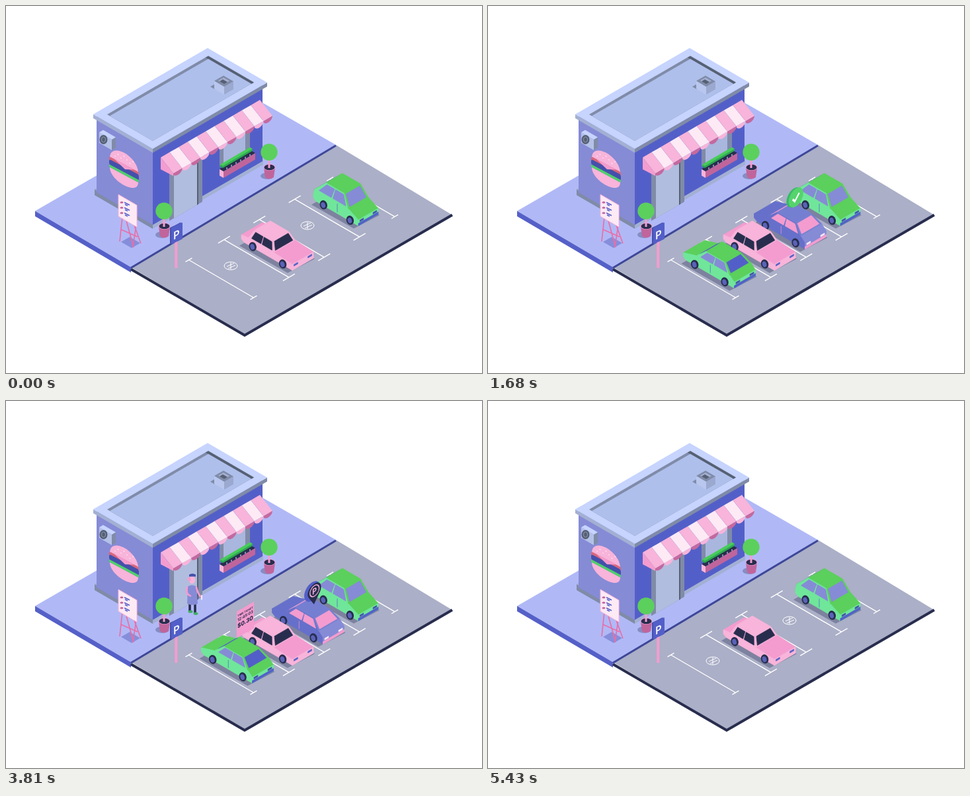
An HTML page that plays this animation: 720x555 px, repeating every 5.46 s.

```html
<!DOCTYPE html>
<html lang="en">
<head>
<meta charset="utf-8">
<title>Parking lot</title>
<style>
html, body { margin: 0; width: 100%; height: 100%; overflow: hidden; background: #fff; }
svg { display: block; width: 720px; height: 555px; }
text { font-family: Inter, Arial, sans-serif; text-anchor: middle; }
</style>
</head>
<body>
<svg id="stage" viewBox="0 0 720 555"></svg>
<script>
const LOOP = 5460, STEP = 30;
const S = .58; // slope of both ground axes on screen
const C = {
  ink: '#282d4e', navy: '#4450ab', blue: '#535fc8', lilac: '#868bd6', walk: '#b0b9f6', road: '#abafc7',
  slate: '#566074', grey: '#808ba8', mid: '#a3b0d3', sky: '#aebfeb', pale: '#c6d4fe',
  pink: '#f8b4da', hot: '#f49ccf', plum: '#c0659c', cream: '#fdeaf5',
  green: '#5bd05c', leaf: '#2aab4c', mint: '#70e69b', shade: '#7d829f'
};

// Markup helpers
const poly = (pts, fill, extra = '') => `<polygon points="${pts}" fill="${fill}" ${extra}/>`;
const path = (d, fill, extra = '') => `<path d="${d}" fill="${fill}" ${extra}/>`;
const line = (d, color, w = 1.5) => path(d, 'none', `stroke="${color}" stroke-width="${w}"`);
const oval = (x, y, rx, ry, fill, extra = '') =>
  `<ellipse cx="${x}" cy="${y}" rx="${rx}" ry="${ry}" fill="${fill}" ${extra}/>`;
const group = (body, attr) => `<g ${attr}>${body}</g>`;
const label = (s, x, y, size, fill, weight = 700) =>
  `<text x="${x}" y="${y}" font-size="${size}" fill="${fill}" font-weight="${weight}">${s}</text>`;
const times = (n, f) => Array.from({ length: n }, (_, i) => f(i)).join('');
const soft = color => `stroke="${color}" stroke-width="2" stroke-linejoin="round"`;

// Upright panel from its lower left corner; k is the slope of its base
const panel = (x, y, w, h, fill, k = -S, extra = '') =>
  poly([[x, y], [x + w, y + k * w], [x + w, y + k * w - h], [x, y - h]], fill, extra);
// Flat tile from its nearest corner: a runs to the back left, b to the back right
const tile = (x, y, a, b, fill) =>
  poly([[x, y], [x - a, y - S * a], [x - a + b, y - S * (a + b)], [x + b, y - S * b]], fill);
const box = (x, y, a, b, h, [top, left, right]) =>
  panel(x - a, y - S * a, a, h, left, S) + panel(x, y, b, h, right) + tile(x, y - h, a, b, top);

function ground() {
  const left = [44, 310], front = [189, 395], right = [499, 210], near = [361, 498], far = [675, 316];
  const down = ([x, y], d) => [x, y + d];
  return poly([left, [358, 129], right, front], C.walk)
    + poly([left, front, down(front, 8), down(left, 8)], '#5560c8')
    + poly([front, right, far, near], C.road)
    + line(`M${down(front, 1)}L${down(right, 1)}`, '#3d4798', 3)
    + line(`M${down(front, 3)}L${near}L${far}`, C.ink, 4);
}

function bays() {
  const lines = times(5, i => {
    const x = 276.5 + 53.4 * i, y = 384 - 30.6 * i, r = i % 4 ? 9 : 5;
    const tick = (a, b) => `M${a - r},${b + r * S}l${2 * r},${-2 * r * S}`;
    return line(`M${x},${y}l98,57${tick(x, y)}${tick(x + 98, y + 57)}`, '#fff', 1.4);
  });
  const marks = times(2, i => {
    const x = 340 + 116 * i, y = 393 - 61 * i;
    return oval(x, y, 10, 6, 'none', 'stroke="#fff"')
      + line(`M${x - 6},${y + 1}l11,-5m-9,8l11,-5M${x},${y - 5}v10`, '#fff', 1);
  });
  return lines + marks;
}

function building() {
  return box(222, 337, 88, 167, 9, [C.mid, C.grey, C.mid])
    + box(222, 331, 85, 166, 114, [C.lilac, C.lilac, C.blue])
    + box(222, 222, 90, 173, 6, [C.pale, C.mid, C.grey])
    + tile(222, 204, 69, 153, C.grey)
    + tile(371, 118, 69, 4, C.slate)
    + tile(222, 204, 65, 149, C.sky)
    + tile(316, 126, 7, 8, C.grey)
    + box(330, 134, 15, 14, 12, [C.grey, '#b9c7ef', '#9ba9d0'])
    + tile(330, 118, 9, 8, C.mid) + tile(330, 118, 7, 5, C.slate);
}

function facade() {
  return panel(247, 325, 50, 76, C.grey) + panel(254, 321, 36, 74, '#b1bdde')
    + panel(289, 301, 2, 74, C.slate)
    + panel(323, 243, 46, 35, C.grey) + panel(329, 238, 33, 31, '#a9b6de')
    + box(329, 260, 6, 48, 10, [C.ink, C.pink, C.plum])
    + box(328, 245, 4, 45, 3, ['#46cd57', C.leaf, C.leaf])
    + times(6, i => line(`M${334 + i * 7},${244 - i * 4}v3`, '#dfe6ff', 1));
}

function awning() {
  const n = 11, w = 150 / n, drop = 24, out = 19;
  return poly('234,229 253,253 253,257 234,247', C.hot) + times(n, i => {
    const x = 234 + i * w, y = 229 - i * w * S, a = x + out, b = y + drop, white = i % 2;
    return path(`M${a},${b}c0,8 ${w},${9 - w * S} ${w},${-w * S}Z`, white ? C.pink : '#c4699f')
      + poly([[x, y], [x + w, y - w * S], [a + w, b - w * S], [a, b]], white ? C.cream : C.pink);
  });
}

function sideWall() {
  const fan = box(160, 218, 19, 6, 16, [C.pale, '#b4c1e8', C.grey])
    + oval(147.5, 202, 6, 7, C.slate) + oval(147.5, 202, 3, 4, 'none', 'stroke="#8d98b5"');
  const layer = (y, h, color) => `<rect x="-22" y="${y}" width="45" height="${h}" rx="${h / 3}" fill="${color}"/>`;
  const bun = (y, h) => path(`M-21,${y}C-21,${y + h} 22,${y + h} 22,${y}Z`, C.pink);
  const burger = bun(-7, -26) + layer(-9, 7, '#d8667e') + layer(-5, 9, C.navy)
    + path('M-14,-9H16L2,-2Z', C.hot) + bun(7, 21) + layer(3, 4, '#4fd06a')
    + times(7, i => oval(-13 + i * 4.5, -14 - i * 5 % 8, 1, .7, C.cream));
  return fan + group(burger, 'transform="matrix(1 .53 0 1 178 248)"');
}

function menuBoard() {
  return tile(190, 366, 16, 13, '#868edb')
    + line('M176,319l-4,37M181,321l12,44M197,331l-5,34M193,329l11,30M174,338l25,11', '#e86fa8', 1.7)
    + panel(170, 318, 28, 33, C.cream, S, `stroke="${C.pink}"`)
    + times(3, i => oval(175, 297 + 8 * i, 2.5, 1.6, C.plum)
      + line(`M179,${297 + 8 * i}l8,4m-7,-1l4,2`, C.blue, 1.4));
}

function plant(x, y) {
  return oval(x - 3, y + 36, 10, 5, '#868dc3')
    + path(`M${x - 8},${y + 24}l2,14q6,5 13,0l2,-14Z`, C.plum)
    + oval(x + .5, y + 23, 9, 5, C.hot) + oval(x + .5, y + 23, 8, 4.3, C.ink)
    + line(`M${x},${y + 10}v14`, C.hot, 3)
    + oval(x, y, 12.7, 12.7, C.green);
}

function roadSign() {
  return line('M257.3,354V396', C.hot, 4)
    + panel(249, 359, 15, 23, C.navy, -.5, soft(C.navy))
    + panel(251, 359, 15, 23, C.blue, -.5, soft(C.blue))
    + group(label('P', 0, 5.5, 16, '#fff', 600), 'transform="matrix(.9 -.45 0 1 258 346)"');
}

// A car is a body with sloping ends and a tapered cabin, placed by its near rear corner
function car({ len = 77, wide = 32, nose = 9, belt, top, base, roof, taper = 4, paint }) {
  const at = (u, v, z) => [u + v, S * (u - v) - z];
  const mix = (a, b, k) => a.map((n, i) => n + (b[i] - n) * k);
  // Part of a four-cornered face: x0..x1 along its first edge, y0..y1 across
  const part = ([a, b, c, d], x0, x1, y0, y1) => [[x0, y0], [x1, y0], [x1, y1], [x0, y1]]
    .map(([x, y]) => mix(mix(a, b, x), mix(d, c, x), y));
  const face = (pts, color) => poly(pts, color, `stroke="${color}" stroke-width=".8" stroke-linejoin="round"`);
  const across = ([u0, z0], [u1, z1], i0 = 0, i1 = 0) =>
    [at(u0, i0, z0), at(u0, wide - i0, z0), at(u1, wide - i1, z1), at(u1, i1, z1)];

  const profile = [[0, nose], [base[0], belt], [base[1], belt], [len, nose]];
  const side = [at(base[0], 0, belt), at(base[1], 0, belt), at(roof[1], taper, top), at(roof[0], taper, top)];
  const rear = across([base[0], belt], [roof[0], top], 0, taper);
  const screen = across([roof[1], top], [base[1], belt], taper, 0);
  const end = across([len, nose], [len, 0]);
  const wheel = u => group(oval(0, 0, 5.6, 7, C.ink) + oval(-.6, .2, 3.2, 4.4, '#5963b8'),
    `transform="translate(${at(u, 1, 0)}) rotate(-18)"`);

  return poly([at(5, -8, 0), at(len, -7, 0), at(len + 2, wide, 0), at(5, wide, 0)], C.shade)
    + face(across(profile[0], profile[1]), paint.rear)
    + face(across(profile[2], profile[3]), paint.hood)
    + face([at(0, 0, 3), at(4, 0, 0), at(len, 0, 0), ...profile.map(([u, z]) => at(u, 0, z)).reverse()], paint.side)
    + face(end, paint.front) + face(part(end, 0, 1, .6, 1), paint.bumper)
    + times(2, i => face(part(end, .08 + .66 * i, .26 + .66 * i, .2, .45), paint.lamp))
    + face(rear, paint.top) + face(part(rear, .1, .9, .15, .85), paint.glass)
    + face(side, paint.side)
    + face(part(side, .1, .48, .1, .86), paint.window)
    + face(part(side, .53, .93, .1, .86), paint.window)
    + face(screen, paint.top) + face(part(screen, .08, .92, .1, .92), paint.glass)
    + face(across([roof[0], top], [roof[1], top], taper, taper), paint.top)
    + line(`M${at(len * .53, 0, belt - 2)}v${belt - 4}`, paint.bumper, .7)
    + wheel(len * .21) + wheel(len * .8);
}

const SEDAN = { belt: 16, top: 27, base: [20, 70], roof: [31, 59] };
const greens = { side: C.mint, top: C.green, rear: C.green, hood: C.green, front: C.mint,
  glass: C.blue, window: C.lilac, bumper: C.blue, lamp: C.navy };
const blues = { side: '#6670cb', top: '#757fd2', rear: '#6670cb', hood: C.lilac, front: C.lilac,
  glass: C.hot, window: C.hot, bumper: C.hot, lamp: C.cream };
const pinks = { side: C.pink, top: C.pink, rear: C.hot, hood: C.hot, front: C.pink,
  glass: C.ink, window: C.ink, bumper: C.pink, lamp: '#5963c6' };

const greenCar = car({ ...SEDAN, paint: greens });
const blueCar = car({ ...SEDAN, paint: blues });
const pinkCar = car({ belt: 11, top: 23, base: [11, 49], roof: [16, 44], paint: pinks });
const hatch = car({ len: 68, wide: 30, belt: 17, top: 34, base: [2, 53], roof: [17, 44], taper: 3,
  paint: { ...greens, glass: C.lilac } });

// Upright badges standing beside the bays, drawn around their own centre
const ISO = 'transform="matrix(.87 -.5 0 1 0 0)"';
const disc = (side, face, mark) => group(
  oval(-3, -2, 13.5, 13.5, side) + oval(1, 0, 13.5, 13.5, face) + mark, ISO);
const checkPin = disc('#37b967', '#55d36c', line('M-5,0L-1,5L7,-4', '#fff', 3));
const crossPin = disc('#ef5870', '#ff7184', line('M0,-7V7M-7,0H7', '#fff', 3));
const parkPin = group(oval(-2, -3, 14, 14, C.blue)
  + path('M1,18L-8,4C-14,-6 -4,-14 4,-13C14,-12 16,0 10,6Z', C.ink)
  + oval(2, -2, 8, 8, 'none', `stroke="${C.pink}" stroke-width="1.5"`)
  + label('P', 2, 2.5, 12, C.pink), ISO);
const ticket = group(`<rect x="-15" y="-20" width="30" height="40" fill="${C.hot}"/>`
  + label('TIME TICKET', 0, -11, 4.2, C.ink) + label('12:45:03', 0, -4, 6.2, C.ink)
  + label('$0.30', 0, 6, 9, C.ink, 800), ISO);

function worker() {
  const leg = (id, x, y) => group(line(`M${x},300V${y}`, C.ink, 3.6)
    + oval(x + 1, y + 1, 3.5, 2, '#3fae63'), `id="${id}"`);
  return leg('legA', 272, 314) + leg('legB', 280, 317)
    + path('M269,277q6,-4 13,0l2,26q-8,4 -16,0Z', C.lilac)
    + path('M268,278q-3,10 5,13M282,278q2,9 6,14', 'none',
      `stroke="${C.hot}" stroke-width="2.6" stroke-linecap="round"`)
    + line('M290,290v7', C.cream, 2)
    + oval(275.5, 267, 4.5, 6, C.pink) + oval(271, 266, 2.5, 3, C.hot)
    + path('M271,262v-3q5,-3 10,0v3Z', C.navy);
}

const stage = document.getElementById('stage');
const spot = (body, x, y) => group(body, `transform="translate(${x} ${y})"`);
const clipped = (body, id, clip) => group(group(body, `id="${id}"`), `clip-path="url(#${clip})"`);
stage.innerHTML = `<defs>
    <clipPath id="edge"><polygon points="0,0 720,0 720,309 0,741"/></clipPath>
    <clipPath id="door"><polygon points="254,244 290,225 340,225 340,340 254,340"/></clipPath>
  </defs>`
  + ground() + bays() + building() + facade() + clipped(worker(), 'worker', 'door')
  + awning() + sideWall() + menuBoard() + plant(398, 221) + plant(239, 310) + roadSign()
  + spot(hatch, 465, 293) + clipped(blueCar, 'blue', 'edge')
  + group(checkPin, 'id="check"') + group(parkPin, 'id="park"')
  + spot(pinkCar, 356, 355)
  + group(crossPin, 'id="cross"') + group(ticket, 'id="ticket"')
  + clipped(greenCar, 'green', 'edge');

const el = {};
stage.querySelectorAll('g[id]').forEach(node => el[node.id] = node);

const ramp = (t, a, b) => Math.min(1, Math.max(0, (t - a) / (b - a)));
const smooth = p => p * p * (3 - 2 * p);
const pop = p => p <= 0 ? 0 : 1 + 2.2 * (p - 1) ** 3 + 1.2 * (p - 1) ** 2;
const move = (node, x, y, sx = 1, sy = sx) =>
  node.setAttribute('transform', `translate(${x} ${y}) scale(${sx} ${sy})`);

// Rolls in while braking, rolls out while speeding up
function drive(node, t, x, y, [a, b, c, d]) {
  const far = 175 * ((1 - ramp(t, a, b)) ** 2 + ramp(t, c, d) ** 2);
  move(node, x + far, y + far * .53);
  node.style.display = far >= 175 ? 'none' : '';
}

// First badge pops up, turns into the second, which then shrinks away
function badge(first, second, t, x, y1, y2, [a, b, c, d, e, f]) {
  const turn = smooth(ramp(t, c, d)), w = Math.abs(1 - 2 * turn);
  const size = pop(ramp(t, a, b)) * (1 - smooth(ramp(t, e, f)));
  move(first, x, y1, turn < .5 ? size * w : 0, size);
  move(second, x, y2, turn < .5 ? 0 : size * w, size);
}

function walk(t) {
  const enter = ramp(t, 2350, 3060), on = ramp(t, 3060, 3300), out = smooth(ramp(t, 4620, 5250));
  const x = -30 * (1 - enter) + 6 * on - 36 * out, y = x * .6;
  const moving = enter < 1 || on > 0 && on < 1 || out > 0;
  const swing = moving ? Math.sin(x * .4) * 14 : 0;
  move(el.worker, x, y);
  el.worker.style.display = enter <= 0 || out >= 1 ? 'none' : '';
  el.legA.setAttribute('transform', `rotate(${swing} 272 300)`);
  el.legB.setAttribute('transform', `rotate(${-swing} 280 300)`);
}

function draw(t) {
  drive(el.blue, t, 402.5, 323, [0, 650, 4750, 5380]);
  drive(el.green, t, 295.5, 382, [476, 1563, 4600, 5230]);
  badge(el.check, el.park, t, 465, 290, 290, [900, 1160, 1650, 1950, 4600, 4850]);
  badge(el.cross, el.ticket, t, 362, 345, 331, [1850, 2150, 3450, 3800, 4560, 4800]);
  walk(t);
}

const start = performance.now();
function tick() {
  const t = (performance.now() - start) % LOOP;
  draw(Math.floor(t / STEP) * STEP);
  requestAnimationFrame(tick);
}
tick();
</script>
</body>
</html>
```
